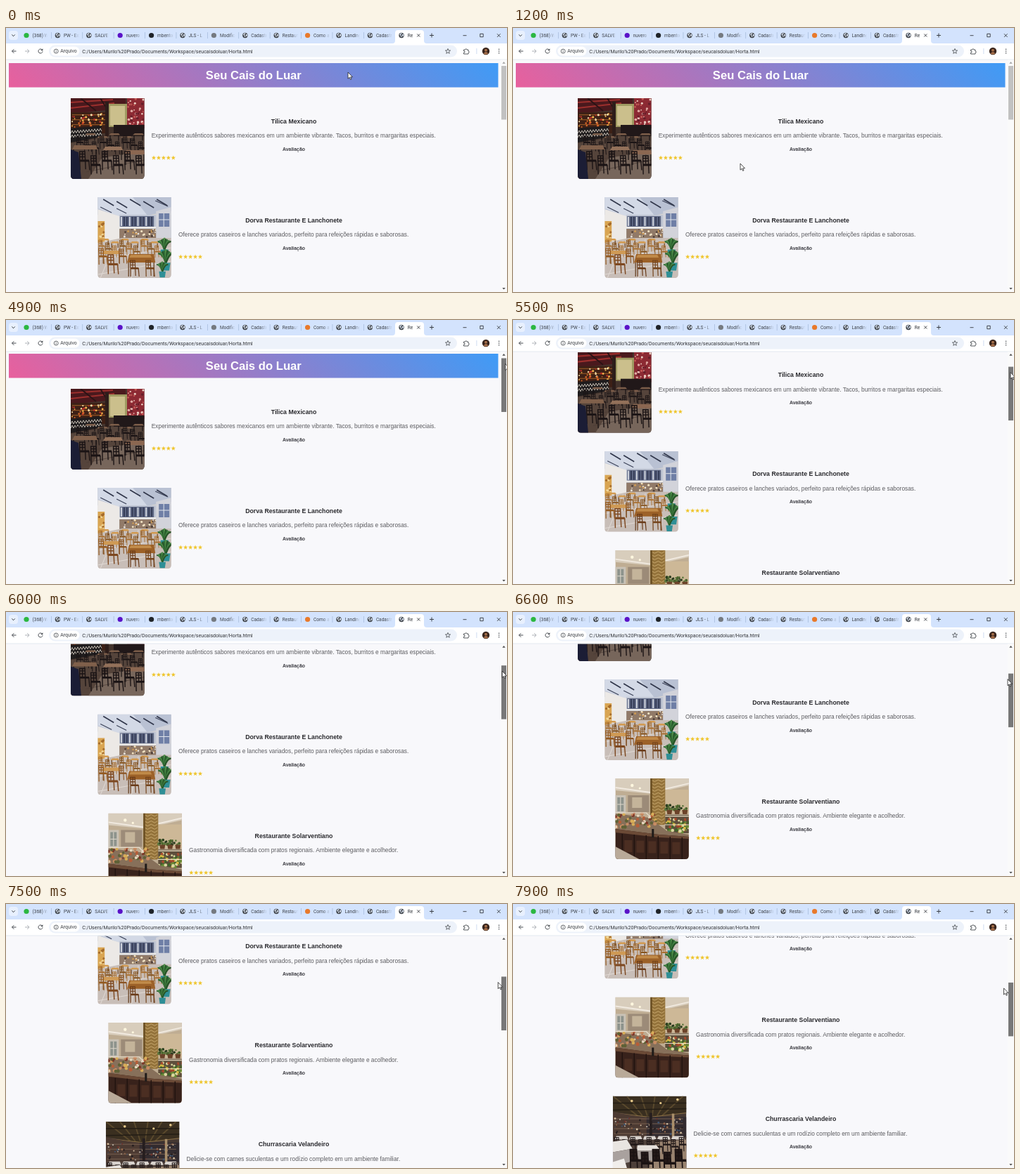
Recreate the animation shown at these times as an HTML page. Size 712 by 376 pixels, loop 8000 ms.

```html
<!DOCTYPE html>
<html lang="pt-BR">
<head>
<meta charset="utf-8">
<title>Restaurantes</title>
<style>
html, body { margin: 0; width: 100%; height: 100%; overflow: hidden; background: #f8f8fb; }
svg { display: block; }
.ui { font-family: Roboto, sans-serif; }
.page { font-family: "Liberation Sans", Arial, sans-serif; }
</style>
</head>
<body>
<svg id="stage" width="712" height="376" viewBox="0 0 712 376" xmlns="http://www.w3.org/2000/svg"></svg>
<script>
const LOOP = 8000, STEP = 100, THUMB_RATE = 0.232;

// ---------- helpers ----------
let seed = 7;
const rnd = () => (seed = (seed * 16807) % 2147483647) / 2147483647;
const rect = (x, y, w, h, fill, extra = '') =>
  `<rect x="${x}" y="${y}" width="${w}" height="${h}" fill="${fill}" ${extra}/>`;
const disc = (x, y, r, fill) => `<circle cx="${x}" cy="${y}" r="${r}" fill="${fill}"/>`;
const shape = (d, fill) => `<path d="${d}" fill="${fill}"/>`;
const line = (d, stroke, w = 1, extra = '') =>
  `<path d="${d}" fill="none" stroke="${stroke}" stroke-width="${w}" ${extra}/>`;
const text = (x, y, size, fill, str, extra = '') =>
  `<text x="${x}" y="${y}" font-size="${size}" fill="${fill}" ${extra}>${str}</text>`;
const repeat = (n, fn) => Array.from({ length: n }, (_, i) => fn(i)).join('');

// scattered round dabs inside a box
const dabs = (n, x, y, w, h, r, colors) => repeat(n, i =>
  disc((x + rnd() * w).toFixed(1), (y + rnd() * h).toFixed(1), (r * (0.6 + rnd() * 0.7)).toFixed(1), colors[i % colors.length]));

const chair = (x, y, s, c) =>
  `<g transform="translate(${x} ${y}) scale(${s})">` +
  line('M1 23L0.5 0H7L8 22M0.7 3H7M1 6.5H7.5M4 0V10', c, 1.2) +
  shape('M1 10H12L13 12.5H1Z', c) + line('M12 12L13 23', c, 1.2) + '</g>';
const table = (x, y, w, h, top, leg) =>
  line(`M${x + 2} ${y + h}V${y + h + w * 0.5}M${x + w - 2} ${y + h}V${y + h + w * 0.5}`, leg, 1.2) +
  shape(`M${x + 3} ${y}H${x + w - 2}L${x + w} ${y + h}H${x}Z`, top);
const plant = (x, y, s) =>
  `<g transform="translate(${x} ${y}) scale(${s})">` +
  repeat(9, i => line(`M0 4Q${(i - 4) * 0.8} -5 ${(i - 4) * 1.7} ${-8 + Math.abs(i - 4)}`, ['#2f6b35', '#4d8c48', '#275428'][i % 3], 1.7)) +
  shape('M-4 4H4L3 11H-3Z', '#2f8f96') + '</g>';

// ---------- pictures, 104.5 x 115 ----------
const cantina = () =>
  rect(0, 0, 105, 115, '#43332c') +
  shape('M0 0H78V12L50 17L0 22Z', '#4a191d') +
  line('M0 6L60 2M0 14L62 7', '#9c2f2d', 2.2) + line('M14 0L36 18M42 0L52 16', '#2c1315', 2) +
  rect(0, 20, 51, 30, '#3d2016') +
  repeat(3, i => rect(2, 23 + i * 7, 47, 1.2, '#8f5424')) +
  dabs(38, 2, 21, 46, 20, 1.3, ['#f0b04c', '#d7672a', '#b32f27', '#f4dca6']) +
  rect(53, 8, 27, 33, '#9f9a62') + rect(56, 11, 21, 28, '#cbbf8c') +
  rect(49, 5, 5, 50, '#2d1d1a') +
  rect(80, 0, 25, 43, '#8c2a33') +
  dabs(44, 81, 1, 23, 38, 1.4, ['#dfa9a2', '#c45855', '#ebd1c4', '#641e29']) +
  rect(61, 38, 44, 16, '#211819') +
  shape('M0 43L44 39V55L0 63Z', '#1f1c1d') +
  repeat(2, j => line('M0 ' + (50 + j * 6) + repeat(11, i => `l2-4l2 ${i % 2 ? 3.4 : 4}`), '#cfc7bb', 0.9)) +
  shape('M0 64L55 54H105V115H0Z', '#55443b') +
  shape('M25 115L45 84L105 76V115Z', '#77665b') +
  line('M18 90L105 73M22 105L105 88', '#4b3d36', 0.7) +
  repeat(5, i => table(20 + i * 17, 50 + (i % 2) * 4, 16, 2.5, '#7d5e4a', '#171213')) +
  repeat(9, i => chair(8 + i * 11, 54 + (i % 3) * 4, 0.8, '#1b1415')) +
  table(2, 67, 36, 6, '#80604b', '#171213') + table(46, 69, 28, 5, '#93715a', '#171213') +
  table(76, 74, 30, 6, '#8b6751', '#171213') +
  repeat(6, i => chair(12 + i * 16, 76 + (i % 2) * 6, 1.15, '#1a1314')) +
  shape('M0 73L11 77L15 115H0Z', '#1b1d35');

const hall = () =>
  rect(0, 0, 105, 115, '#d9d5d1') +
  shape('M0 0H105V20L56 28L0 25Z', '#b9c1d3') +
  shape('M0 0H50L70 25L30 27L0 16Z', '#d3d9e6') +
  repeat(5, i => line(`M${8 + i * 19} ${3 + (i % 2) * 3}l15 9`, '#30364a', 1.6)) +
  line('M4 14l16 8M27 16l14 7M82 5l18 8', '#3b4258', 1.2) +
  shape('M0 17L31 27V61L0 66Z', '#ece9e6') + rect(31, 25, 74, 35, '#bfc5d3') +
  rect(32, 27, 48, 15, '#5d6682') +
  repeat(12, i => rect(33 + i * 3.9, 28, 1.8, 13, i % 3 ? '#343b55' : '#d8dce4')) +
  rect(30, 42, 53, 2.5, '#eceae7') +
  rect(31, 45, 55, 14, '#917a68') + dabs(30, 33, 46, 50, 11, 1.3, ['#f1e2c2', '#504039', '#cf9b54', '#e5e0d8']) +
  shape('M83 20L105 14V66H83Z', '#d2d3da') + rect(87, 23, 15, 19, '#6f7fa6') +
  line('M94 23V42M87 32H102', '#e2e6ec', 1) +
  rect(0, 34, 10, 31, '#d9a552') + dabs(14, 0, 36, 9, 25, 1.5, ['#a56b2b', '#f1d697']) +
  shape('M0 65L35 58H105V115H0Z', '#c8beb8') +
  line('M0 89L105 72M0 110L105 91M26 62L4 115M58 60L48 115', '#e0d9d4', 1) +
  repeat(6, i => table(4 + i * 14, 59 + (i % 2) * 4, 13, 2.5, '#d29a50', '#6d431e')) +
  repeat(9, i => chair(1 + i * 10, 61 + (i % 3) * 4, 0.75, i % 2 ? '#86541f' : '#a86f30')) +
  table(6, 76, 27, 5, '#cf9a55', '#6d431e') +
  chair(14, 82, 1.2, '#7d4820') + chair(1, 73, 1, '#93591f') + chair(30, 74, 0.9, '#8b5423') +
  table(42, 81, 40, 12, '#9c6128', '#5d3516') + shape('M47 82H75L77 86H45Z', '#c08a49') +
  chair(46, 90, 1, '#693a18') + chair(68, 90, 1, '#74441c') +
  plant(95, 69, 1.4) + plant(97, 87, 1.6) + plant(92, 101, 1.2);

const buffet = () =>
  rect(0, 0, 105, 115, '#bfad93') +
  shape('M0 0H105V10L52 22L0 17Z', '#d8cdbc') + line('M0 13L50 20L105 7', '#f1eae0', 1.8) +
  disc(24, 10, 2.2, '#fff7df') + disc(35, 14, 1.6, '#fff7df') +
  rect(0, 24, 15, 26, '#c9c2b6') + rect(3, 27, 9, 20, '#8d938c') + line('M7.5 27V47M3 37H12', '#ded7ca', 1) +
  rect(18, 24, 30, 24, '#9c8b78') + rect(24, 27, 14, 15, '#c4b49a') +
  rect(70, 16, 35, 34, '#cdb897') +
  rect(50, 0, 21, 66, '#94733b') +
  repeat(14, i => line(`M51 ${2 + i * 4.6}l5 2.5l5-2.5l5 2.5l4-2.5`, '#cbac72', 0.9)) +
  rect(50, 0, 2.5, 66, '#6a4f23') +
  dabs(24, 72, 38, 30, 7, 2, ['#4b652d', '#5d773d', '#2c3d1f']) +
  repeat(3, i => shape(`M${73 + i * 11} 45h8l-1 6h-6Z`, '#6b4229')) +
  rect(71, 52, 34, 26, '#5d4e3c') + rect(71, 53, 34, 1.5, '#d9ccb4') +
  dabs(60, 71, 57, 34, 20, 1.9, ['#688b37', '#d6b944', '#a8492c', '#d9d7a0', '#3f6329']) +
  line('M70 66H105', '#e4d9c1', 1.2) +
  shape('M0 50L48 56L74 75L105 80V90L60 84L0 74Z', '#87705a') +
  dabs(60, 0, 50, 58, 20, 2, ['#b65d38', '#d9ad58', '#7c3426', '#c78c63', '#5f6136', '#e6d8bf']) +
  line('M0 49H44L50 55', '#e6dccb', 1.2) +
  shape('M0 72L62 80L105 83V115H0Z', '#38221b') + shape('M0 72L62 80L105 83V86L62 84L0 77Z', '#6b4a36') +
  repeat(6, i => line(`M${10 + i * 17} ${79 + i}V115`, '#20130f', 1.4)) +
  repeat(5, i => rect(13 + i * 17, 88 + i * 0.7, 11, 17, '#4b2e22')) +
  rect(52, 72, 3, 12, '#1f1b19') + shape('M0 97L34 115H0Z', '#b9aa99');

const grill = () =>
  rect(0, 0, 105, 115, '#453832') +
  shape('M0 0H105V23L52 30L0 22Z', '#3a2f20') +
  repeat(6, i => line(`M${i * 20} 0L${35 + i * 7} 28`, '#5b4a2d', 1.8)) +
  line('M0 10H105M0 20L105 18', '#231d15', 1.3) + line('M0 24L52 30L105 24', '#8a6f42', 1.2) +
  disc(27, 7, 1.8, '#e6c98a') + disc(68, 10, 1.6, '#e6c98a') + disc(92, 5, 1.8, '#e6c98a') +
  shape('M0 23L48 31V60H0Z', '#4c3a32') + rect(48, 30, 57, 30, '#322b2f') +
  repeat(4, i => rect(2, 32 + i * 7, 98, 0.9, '#7d6553')) +
  dabs(80, 2, 31, 98, 24, 1.2, ['#94694c', '#d3c0a3', '#40536c', '#6d332b', '#b3a89d', '#241d1e']) +
  rect(52, 24, 4, 38, '#261e1f') + rect(84, 25, 3.5, 39, '#a98f6b') +
  shape('M0 58H105V115H0Z', '#4d3f39') + shape('M48 115L60 66L105 62V115Z', '#99836f') +
  repeat(5, i => shape(`M${5 + i * 20} 57h15l2 5h-19Z`, '#d9d3ce')) +
  repeat(9, i => chair(2 + i * 11.5, 59 + (i % 2) * 3, 0.9, '#1e1616')) +
  shape('M0 65L20 62L28 75L0 80Z', '#e9e5e1') + shape('M0 80L28 75L24 94L0 100Z', '#a9a19e') +
  shape('M35 70H62L68 78H34Z', '#e6e1dc') + shape('M34 78H68L65 92H37Z', '#a39a96') +
  repeat(5, i => shape(`M${24 + i * 16} ${76 + (i % 2) * 4}h9l2 15h-10Z`, '#251a19') +
    chair(24 + i * 16, 76 + (i % 2) * 4, 1.4, '#1b1313')) +
  shape('M0 94L16 89L24 115H0Z', '#f1eeeb');

// ---------- page ----------
const places = [
  [92, 'Tilica Mexicano', 'Experimente autênticos sabores mexicanos em um ambiente vibrante. Tacos, burritos e margaritas especiais.', cantina],
  [130.2, 'Dorva Restaurante E Lanchonete', 'Oferece pratos caseiros e lanches variados, perfeito para refeições rápidas e saborosas.', hall],
  [145.3, 'Restaurante Solarventiano', 'Gastronomia diversificada com pratos regionais. Ambiente elegante e acolhedor.', buffet],
  [141.8, 'Churrascaria Velandeiro', 'Delicie-se com carnes suculentas e um rodízio completo em um ambiente familiar.', grill]
];
const starPath = (cx, cy, r) => 'M' + Array.from({ length: 10 }, (_, i) => {
  const a = i * Math.PI / 5 - Math.PI / 2, k = i % 2 ? r * 0.42 : r;
  return (cx + Math.cos(a) * k).toFixed(2) + ' ' + (cy + Math.sin(a) * k).toFixed(2);
}).join('L') + 'Z';
const mid = 'text-anchor="middle"', bold = mid + ' font-weight="700"';

const place = ([x, name, about, picture], i) =>
  `<g transform="translate(0 ${100 + i * 141})">` +
  `<g transform="translate(${x} 0)"><g clip-path="url(#photo)">${picture()}</g></g>` +
  text(409, 35.7, 8.75, '#2a2a2e', name, bold) +
  text(x + 114.8, 56, 8.33, '#5c5c60', about) +
  text(409, 74.5, 6.9, '#3c3c42', 'Avaliação', bold) +
  repeat(5, k => shape(starPath(x + 118 + k * 6.95, 84.9, 3.4), '#efc52c')) + '</g>';

const page = () =>
  '<g class="page" clip-path="url(#view)"><g id="content">' +
  rect(4, 50, 695.5, 34.5, 'url(#banner)') +
  text(351.8, 73, 16.67, '#fff', 'Seu Cais do Luar', bold) +
  places.map(place).join('') + '</g></g>';

// ---------- browser frame ----------
const globe = x => disc(x, 10.5, 3.7, '#454a50') +
  shape(`M${x - 2.8} 9.2q1.4-2.2 3.4-2l-.4 1.5-1.4.6.2 1.2 1.5.3-.2 1.6-1 .5-.2-1.4z`, '#dfe8f6') +
  shape(`M${x + 1.4} 9l1.5-.4.1 2.4-1.2 1.2-.7-1.5z`, '#dfe8f6');
const tabs = [
  ['(368) W', '#2bb741'], ['PW - Ex'], ['SALVE'], ['nuvero', '#5a12c8'], ['mbento', '#1f2328'], ['JLS - L'],
  ['Modific', '#757a80'], ['Cadastr'], ['Restaur'], ['Como a', '#e8792b'], ['Landing'], ['Cadastr']
];
const tab = ([label, mark], i) => {
  const x = 29 + i * 44.4;
  return (mark ? disc(x, 10.5, 3.6, mark) : globe(x)) +
    text(x + 8.5, 12.9, 6.5, '#3f444b', label) +
    rect(x + 22, 4, 8, 13, 'url(#fade)') + rect(x + 30, 4, 5, 13, '#d3e3fd') +
    (i < 11 ? rect(x + 35, 6, 0.7, 9, '#a3b8d8') : '');
};

const frame = () => '<g class="ui">' +
  rect(0, 0, 712, 22, '#d3e3fd') +
  rect(4, 4, 13, 13, '#e8f0fe', 'rx="4"') + line('M8.3 9.5L10.5 11.7L12.7 9.5', '#30343a', 1) +
  tabs.map(tab).join('') +
  shape('M549 22Q553 22 553 18V7Q553 3 557 3H590Q594 3 594 7V18Q594 22 598 22Z', '#fff') +
  globe(562) + text(570.7, 12.9, 6.5, '#30343a', 'Re') +
  line('M584.3 8.5l4 4m0-4l-4 4', '#30343a', 0.9) +
  line('M602 10.5h6m-3-3v6', '#30343a', 0.9) +
  line('M649.5 10.7h5M698 8.3l4.6 4.6m0-4.6l-4.6 4.6', '#202124', 0.8) +
  line('M673.8 8.3h4.4v4.4h-4.4z', '#202124', 0.8) +
  rect(0, 22, 712, 23, '#fff') + rect(0, 44.6, 712, 0.8, '#dde3ec') +
  rect(61, 24.5, 580, 17, '#edf2fa', 'rx="8.5"') +
  line('M14.5 33H8.5m2.8-2.8L8.5 33l2.8 2.8', '#474b50', 1) +
  line('M27 33h6m-2.8-2.8L33 33l-2.8 2.8', '#aeb2b7', 1) +
  line('M51.3 31A3 3 0 1 0 52 33.4', '#474b50', 1) + shape('M52.4 29.3v3h-3z', '#474b50') +
  rect(63.5, 26.5, 41, 13, '#fff', 'rx="6.5"') +
  line('M74.2 33a3 3 0 1 0-6 0a3 3 0 1 0 6 0M71.2 32.5v2.2M71.2 31v.8', '#474b50', 0.8) +
  text(77.3, 35.4, 6.9, '#3a3d42', 'Arquivo') +
  text(108.3, 35.5, 7.07, '#303236', 'C:/Users/Murilo%20Prado/Documents/Workspace/seucaisdoluar/Horta.html') +
  line(starPath(628, 33.2, 3.8), '#474b50', 0.8) +
  line('M650.5 31h2.1a1.2 1.2 0 1 1 2.4 0h2v2a1.2 1.2 0 1 1 0 2.4v1.6h-6.5v-1.9a1.2 1.2 0 1 0 0-2.3z', '#474b50', 0.9) +
  rect(668.5, 29, 0.8, 8, '#c3d4ee') +
  disc(682, 33, 5.2, '#38251d') + disc(682, 31.7, 1.9, '#a66f4a') + shape('M678.5 36.6q3.5-5 7 0q-3.5 2.3-7 0z', '#a66f4a') +
  repeat(3, i => disc(700.6, 30.3 + i * 2.7, 0.8, '#474b50')) + '</g>';

const bar = () => rect(703, 45.4, 9, 331, '#fafafa') +
  '<path id="up" d="M705.3 50.7h4.4l-2.2-2.6z"/>' + shape('M705.3 370h4.4l-2.2 2.6z', '#505050') +
  '<rect id="thumb" x="704" y="54" width="7" height="76.5"/>';

document.getElementById('stage').innerHTML = `<defs>
  <clipPath id="view"><rect y="45.4" width="703" height="331"/></clipPath>
  <clipPath id="photo"><path d="M0 0H104.5V110Q104.5 115 99.5 115H5Q0 115 0 110Z"/></clipPath>
  <linearGradient id="banner" gradientUnits="userSpaceOnUse" x1="169.3" y1="249.7" x2="534.3" y2="-115.3">
    <stop stop-color="#e8609d"/><stop offset="1" stop-color="#3f9bf6"/></linearGradient>
  <linearGradient id="fade"><stop stop-color="#d3e3fd" stop-opacity="0"/><stop offset="1" stop-color="#d3e3fd"/></linearGradient>
  </defs>` + rect(0, 0, 712, 376, '#f8f8fb') + page() + frame() + bar() +
  '<path id="cursor" d="M0 0V9.2L2.1 7.3L3.6 10.4L5 9.8L3.6 6.8H6.5Z" fill="#fff" stroke="#222" stroke-width=".8" stroke-linejoin="round"/>';

// ---------- motion ----------
const scrollKeys = [[4800, 0], [4900, 2], [5500, 54.3], [6600, 145], [7100, 177], [7900, 249.5]];
const pointerKeys = [
  [0, 486, 63], [700, 707, 80], [800, 707, 80], [1100, 321, 193], [1200, 323, 193], [2100, 323, 193],
  [2200, 323, 192], [2500, 323, 192], [2700, 710, 66], [3500, 710, 66], [3600, 710, 62],
  [4900, 709.7, 62], [5500, 707, 62], [6600, 703, 62], [7100, 701, 62], [7900, 697.5, 62]
];
const at = (keys, t, k = 1) => {
  if (t <= keys[0][0]) return keys[0][k];
  const i = keys.findIndex(key => key[0] > t);
  if (i < 0) return keys[keys.length - 1][k];
  const a = keys[i - 1], b = keys[i];
  return a[k] + (b[k] - a[k]) * (t - a[0]) / (b[0] - a[0]);
};
const [content, thumb, up, cursor] = ['content', 'thumb', 'up', 'cursor'].map(id => document.getElementById(id));

function draw(time) {
  const t = Math.floor((time % LOOP) / STEP) * STEP;
  const scroll = at(scrollKeys, t), shift = scroll * THUMB_RATE;
  const hover = (t >= 700 && t < 900) || t >= 2700;
  content.setAttribute('transform', `translate(0 ${-scroll})`);
  thumb.setAttribute('y', 54 + shift);
  thumb.setAttribute('fill', t >= 4200 ? '#787878' : hover ? '#a8a8a8' : '#c1c1c1');
  up.setAttribute('fill', scroll ? '#505050' : '#a3a3a3');
  cursor.setAttribute('transform', `translate(${at(pointerKeys, t)} ${at(pointerKeys, t, 2) + shift})`);
}

const start = performance.now();
function tick() {
  draw(performance.now() - start);
  requestAnimationFrame(tick);
}
tick();
</script>
</body>
</html>
```
